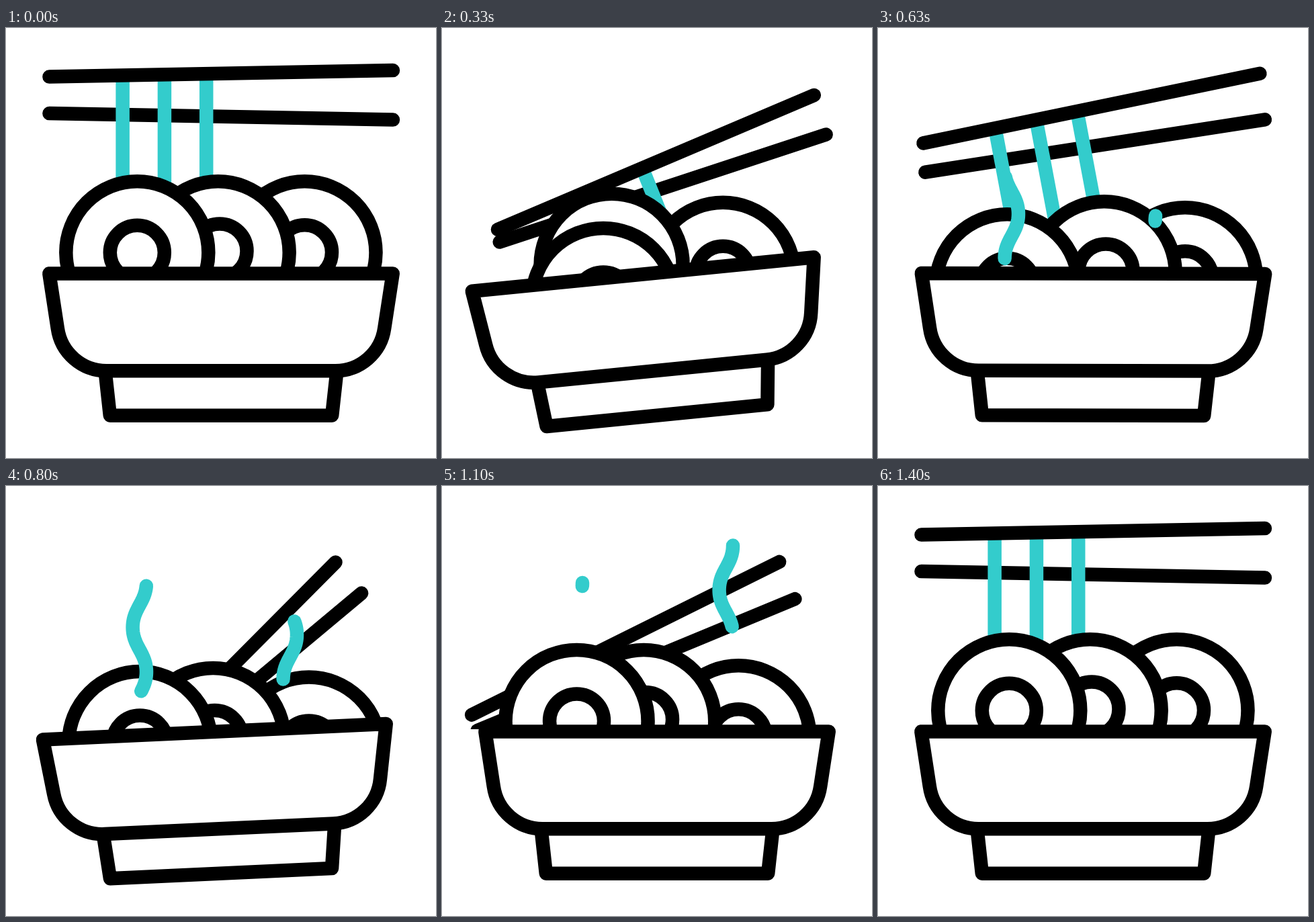
These frames come from a looping animation (640 by 640 pixels, 1.67 s). An HTML page with a canvas:

```html
<!DOCTYPE html>
<html lang="en">
<head>
<meta charset="utf-8">
<title>Noodle bowl</title>
<style>
html, body { margin: 0; width: 100%; height: 100%; overflow: hidden; background: #fff; }
canvas { display: block; width: 100vw; height: 100vh; }
</style>
</head>
<body>
<canvas id="stage" width="640" height="640"></canvas>
<script>
const ctx = document.getElementById('stage').getContext('2d');
const LOOP = 1670, STEP = 100 / 3, LINE = 20.5, HALF = 255.8;
const INK = '#000', TEAL = '#33cccc', RAD = Math.PI / 180;

// Eased rise from 0 to 1, and a rise followed by a fall.
const ramp = (k, from, to) => {
  const u = Math.min(1, Math.max(0, (k - from) / (to - from)));
  return u * u * (3 - 2 * u);
};
const bump = (k, from, peak, to) => ramp(k, from, peak) - ramp(k, peak, to);

// Smooth curve through values at the given times, at rest on both ends.
function curve(k, times, values) {
  const last = times.length - 1;
  if (k >= times[last]) return values[last];
  const i = times.findIndex((t, n) => k < times[n + 1]);
  const slope = n => n === 0 || n === last ? 0
    : (values[n + 1] - values[n - 1]) / (times[n + 1] - times[n - 1]);
  const h = times[i + 1] - times[i], u = (k - times[i]) / h, v = 1 - u;
  return values[i] * v * v * (1 + 2 * u) + values[i + 1] * u * u * (3 - 2 * u)
    + h * u * v * (v * slope(i) - u * slope(i + 1));
}

// Swings left, right, left and back to level.
const tilt = k => -9.5 * bump(k, 0, 7.4, 15.1) + 5 * bump(k, 7.4, 15.1, 21.9) - 3 * bump(k, 15.1, 21.9, 31.5);

// Each dip is the furthest [dx, dy, turn] of the stick's centre.
const lower = { y: 131.8, angle: 1.06, dips: [[14, 176, 31.8], [15, 228, 45.7]] };
const upper = { y: 67.8, angle: -1.06, dips: [[-3, 218, 36.2], [-12, 270, 49.2]] };

// Back to front; path holds offsets from the resting place.
const coils = [
  { x: 444.5, hole: [0, -0.5], rest: 39, path: [[-31, 15], [-17.5, 39], [12.5, 39], [-3.5, 64.5]] },
  { x: 315.7, hole: [2.3, -2.4], rest: 36, path: [[-109, 65], [-24, -7], [21, 30], [-37, 43]] },
  { x: 195.3, hole: [0, 0], rest: 36, path: [[69, 35], [23, 81], [-3, 49], [13, 45]] }
];

const steams = [
  { x: 188.6, y: 343, lead: 10.5, trail: 20 },
  { x: 412.6, y: 287.5, lead: 17.4, trail: 27 }
];

const bodyPath = new Path2D('M64.3 365.5H575.7L563.2 447A73.5 73.5 0 0 1 490.5 510.2H149.5A73.5 73.5 0 0 1 76.8 447Z');
const footPath = new Path2D('M147.7 512L154.8 576.7H485.2L492.3 512');

function stroke(color, cap, draw) {
  ctx.beginPath();
  draw();
  ctx.strokeStyle = color;
  ctx.lineCap = cap;
  ctx.stroke();
}

function stick({ y, angle, dips: [first, second] }, k, strands) {
  const stir = bump(k, 0, 5.5, 16), drop = bump(k, 16, 26.7, 41), turn = bump(k, 16, 26, 40.3);
  const slide = -40 * bump(k, 28, 33, 41);
  ctx.save();
  ctx.translate(320.2 + slide + first[0] * stir + second[0] * drop, y + first[1] * stir + second[1] * drop);
  ctx.rotate((angle - first[2] * stir - second[2] * turn) * RAD);
  for (let i = 0; i < strands; i++) {
    ctx.save();
    ctx.translate(109.2 + 62.3 * i - HALF, 0);
    ctx.rotate(-angle * RAD);
    stroke(TEAL, 'butt', () => { ctx.moveTo(0, 0); ctx.lineTo(0, 190); });
    ctx.restore();
  }
  stroke(INK, 'round', () => { ctx.moveTo(-HALF, 0); ctx.lineTo(HALF, 0); });
  ctx.restore();
}

function coil({ x, hole, rest, path }, k) {
  const drift = axis => curve(k, [0, 5, 13, 19, 29, rest], [0, ...path.map(p => p[axis]), 0]);
  const cx = x + drift(0), cy = 334.3 + drift(1);
  const ring = (dx, dy, r) => stroke(INK, 'butt', () => ctx.arc(cx + dx, cy + dy, r, 0, 7));
  ctx.beginPath();
  ctx.arc(cx, cy, 106, 0, 7);
  ctx.fillStyle = '#fff';
  ctx.fill();
  ring(...hole, 40.5);
  ring(0, 0, 106);
}

// Point on a rising wave of three half turns, p from 0 to 1.
function wave(p) {
  const n = Math.min(2, Math.floor(p * 3)), u = p * 3 - n, v = 1 - u;
  const side = u * u * (3 - 2 * u);
  const rise = 3 * v * v * u * 0.43 + 3 * v * u * u * 0.57 + u * u * u;
  return [20.4 * (n % 2 ? 1 - side : side), -66.3 * (n + rise)];
}

function steam({ x, y, lead, trail }, k) {
  const end = ramp(k, lead, lead + 14.7), start = ramp(k, trail, trail + 14.2);
  if (end <= start) return;
  stroke(TEAL, 'round', () => {
    for (let i = 0; i <= 60; i++) {
      const [dx, dy] = wave(start + (end - start) * i / 60);
      ctx.lineTo(x + dx, y + dy);
    }
  });
}

function turnBowl(k) {
  ctx.translate(320, 576.7);
  ctx.rotate(tilt(k) * RAD);
  ctx.translate(-320, -576.7);
}

function bowl(k) {
  ctx.save();
  turnBowl(k);
  ctx.fillStyle = '#fff';
  ctx.strokeStyle = INK;
  ctx.lineCap = 'butt';
  for (const path of [footPath, bodyPath]) {
    ctx.fill(path);
    ctx.stroke(path);
  }
  ctx.restore();
}

function draw(k) {
  ctx.fillStyle = '#fff';
  ctx.fillRect(0, 0, 640, 640);
  ctx.lineWidth = LINE;
  ctx.lineJoin = 'round';

  // Everything inside the bowl ends at its rim.
  ctx.save();
  turnBowl(k);
  ctx.beginPath();
  ctx.rect(-400, -600, 1440, 962);
  ctx.resetTransform();
  ctx.clip();
  stick(lower, k, 0);
  stick(upper, k, 3);
  coils.forEach(c => coil(c, k));
  ctx.restore();

  bowl(k);
  steams.forEach(s => steam(s, k));
}

// Thirty steps a second, each starting on a whole 10 ms.
function stepAt(ms) {
  const k = Math.floor(ms / STEP);
  return Math.round((k + 1) * STEP / 10) * 10 <= ms ? k + 1 : k;
}

const began = performance.now();
function tick() {
  draw(stepAt((performance.now() - began) % LOOP));
  requestAnimationFrame(tick);
}
tick();
</script>
</body>
</html>
```
